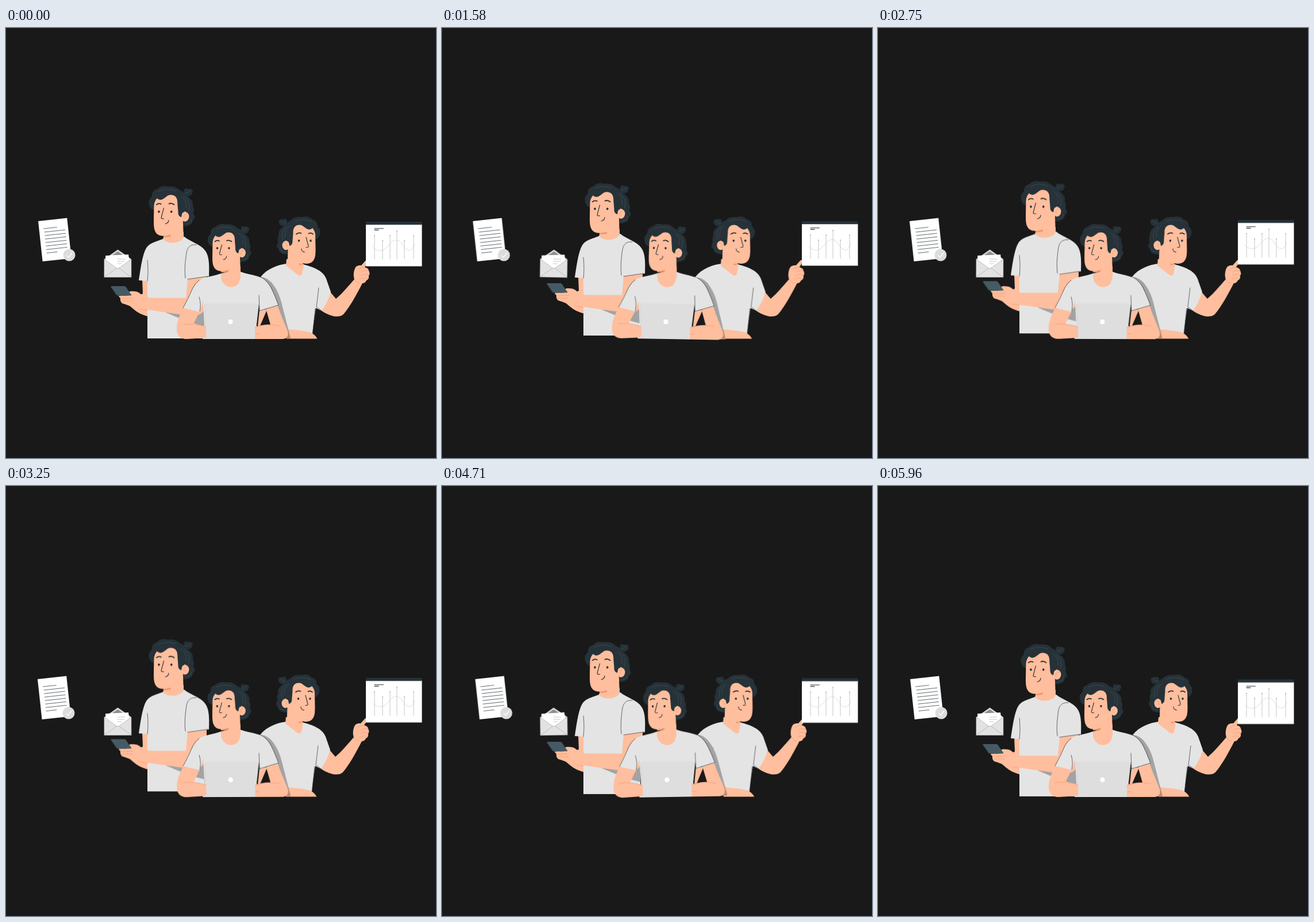
An HTML page without scripts that plays this animation: 748 by 748 pixels, repeating every 6 s.

```html
<!DOCTYPE html>
<html lang="en">
<head>
<meta charset="utf-8">
<title>Three colleagues</title>
<style>
  html, body { margin: 0; width: 100%; height: 100%; overflow: hidden; background: #191919; }
  svg { display: block; width: 100vw; height: 100vh; }

  .skin { fill: #ffbe9d; }
  .shade { fill: #eb996e; }
  .hair { fill: #263238; }
  .shirt { fill: #e4e4e4; }
  .dim { fill: #a3a3a3; }
  .ink, .crease, .strand, .thin, .wave { fill: none; stroke-linecap: round; stroke-linejoin: round; }
  .ink { stroke: #263238; stroke-width: .7; }
  .bold { stroke-width: 1.1; }
  .brow { stroke-width: 1.7; }
  .crease { stroke: #eb996e; stroke-width: .7; }
  .strand { stroke: #455a64; stroke-width: .6; }
  .thin { stroke: #a0a0a0; stroke-width: .6; }
  .wave { stroke: #c8c8c8; stroke-width: .6; }

  .float { animation: rise 6s linear infinite; }
  .bob { animation: rise 1.5s linear infinite; }
  .shake { animation: shake 6s ease-in-out infinite; }
  .sway { animation: sway 6s linear infinite; }
  .desk { transform-origin: 391px 441px; }
  .mail { transform-origin: 194px 410px; }

  @keyframes rise {
    50% { transform: translateY(-9.5px); }
  }
  @keyframes shake {
    0%, 100% { transform: translateX(0); }
    10%, 90% { transform: translateX(-1px); }
    20%, 80% { transform: translateX(2px); }
    30%, 50%, 70% { transform: translateX(-4px); }
    40%, 60% { transform: translateX(4px); }
  }
  @keyframes sway {
    0%, 50%, 100% { transform: rotate(0deg); }
    25% { transform: rotate(1deg); }
    75% { transform: rotate(-1deg); }
  }
</style>
</head>
<body>
<svg viewBox="0 0 748 748" xmlns="http://www.w3.org/2000/svg">
  <defs>
    <g id="head">
      <path class="hair" d="M362 381C355 381 351 375 351 368C350 362 355 361 356 357C356 350 360 347 365 346C369 341 376 340 383 342C391 340 399 344 402 348Q406 349 409 352C407 346 412 343 416 346C421 344 425 349 422 353C420 358 415 358 413 357C419 361 425 366 423 374C426 379 425 383 424 386C428 391 427 395 423 397C424 403 416 407 408 407L385 400Z"/>
      <path class="skin" d="M359.500 370C361 363 363 358 367 358L387 354C397 354 400 361 400 369L402 384C406 381 416 382 417 390C417 398 411 401 407 398L408 426H388L387 420.500C379 423.500 370 424 365 420C359.500 415 359 408 359 398Z"/>
      <path class="hair" d="M359 373C359 364 358 354 364 349C375 344 394 347 401 353C409 361 411 373 409 384Q405 383 404.500 392Q398.500 391 399 382L398 370C398.500 360 394 355.500 387 355.500C380 355.500 378 362 371 363.500Q367 364 364.500 361Q361 364 359 373Z"/>
      <path class="strand" d="M366 350Q380 343 395 349M404 357Q414 364 412 377M409 358Q421 367 416 382M411 352Q415 353 419 348M412 403Q421 402 421 395"/>
      <path class="crease" d="M409 394Q407 387 413 387"/>
      <path class="ink brow" d="M363.500 371.500Q367 368.500 371 370.500M384 370Q388 368 392.500 371.500"/>
      <path class="ink bold" d="M375.500 377L371.500 392Q370.500 395 375.500 394.500M378 403Q383.500 402 383.500 397"/>
      <ellipse class="hair" cx="367.500" cy="383" rx="1.700" ry="2"/>
      <ellipse class="hair" cx="388" cy="383" rx="1.700" ry="2"/>
    </g>
  </defs>

  <!-- document with tick -->
  <g class="shake">
    <g transform="translate(56 336) rotate(-6.2)">
      <path fill="#fff" d="M0 0H50.500V70.500H0Z"/>
      <path class="ink" d="M8 14H31M9 20.100H45M9 26.200H45M9 32.300H45M9 38.400H45M9 44.500H45M9 50.600H45M9 56.700H27"/>
    </g>
    <circle cx="110" cy="395" r="10.500" fill="#dcdcdc"/>
    <path d="M105.500 395.500L109 399L115 391" fill="none" stroke="#fff" stroke-width="1.300"/>
  </g>

  <!-- envelope -->
  <g class="sway mail">
    <path fill="#dedede" d="M171 402L194.500 385.500L218 402V433.500H171Z"/>
    <path fill="#8f8f8f" d="M185 395L194.500 388.500L204 395Z"/>
    <path fill="#fff" d="M173 396L213 394L215 410L194.500 420L174 411Z"/>
    <path class="thin" d="M194 402H207M194 406H206M194 410H201"/>
    <path fill="#e2e2e2" d="M171 402L192 417Q194.500 418.500 197 417L218 402V433.500H171Z"/>
    <path class="thin" d="M171 402L192 417.500Q194.500 419 197 417.500L218 402V433.500H171ZM171 433.500L192 418M218 433.500L197 418"/>
  </g>

  <!-- standing man with phone -->
  <g class="float">
    <path class="skin" d="M237 437H250V502C234 500 221 490 209 477L222 470L238 462Z"/>
    <path class="crease" d="M213 478Q228 490 246 491"/>
    <path class="shirt" d="M273 367C262 371 250 374 244.500 382C237 394 234 420 231 439L246 440V540H345V434L353 432C354 410 353 397 347 388C339 376 321 372 310 363Q290 360 273 367Z"/>
    <path class="skin" d="M274 355H309V364C305 374 282 378 273 367Q275 362 274 355Z"/>
    <path class="shade" d="M274 358Q287 360 298 350Q293 365 274 364Z"/>
    <path class="dim" d="M278 495L345 490V519Q325 514 309 508Z"/>
    <path class="skin" d="M316 437L349 433V478C347 496 337 501 320 500C290 497 262 492 238 489C222 488 211 481 202 479Q198 475 199 470L196 467Q198 464 202 466L218 466C219 464 216 462 214 460Q215 457 222 458C231 458 234 463 240 467Q248 470 258 469.500H313Z"/>
    <path fill="#455a64" d="M182 450Q183 449 185 449H206Q208 449 209 451L219 466H197Q194 466 193 464Z"/>
    <path fill="#37474f" d="M182 450L194 465L197 466H195L192 465Z"/>
    <path class="skin" d="M197 468Q199 465 206 466L222 465Q219 471 208 471Z"/>
    <path class="crease" d="M202 471L221 470M202 475L220 475"/>
    <path class="ink" d="M246 404Q248 423 246 440M331 377C318 376 314 384 313 398Q310 418 312 435M316 437L351 432"/>
    <use href="#head" transform="translate(257.500 275) scale(1.06) translate(-359.5 -341)"/>
  </g>

  <!-- presenting man -->
  <g class="shake">
    <path class="skin" d="M563 458L574 471C586 461 597 447 606 437C603 428 606 419 609 415Q614 412 618 413L626 404Q630 402 630 407L624 416Q631 418 631 422Q634 427 631 431Q632 437 627 439Q625 444 620 444C610 463 599 484 587 498C579 505 564 502 549 492L541 484Z"/>
    <path class="crease" d="M613 421Q617 415 623 417M618 425Q623 420 631 423M618 431Q623 426 631 430M617 437Q622 433 628 436M606 437Q609 443 615 444"/>
    <path class="shirt" d="M488 410C473 412 455 418 443 433L450 480L490 540H532Q535 512 539 487L549 492Q560 477 565 459L557 436C552 423 538 417 517 411Z"/>
    <path class="skin" d="M488 402H511L518 412L515 428Q512 433 506 428L487 413Z"/>
    <path class="shade" d="M500 405Q508 411 518 410Q509 416 499 408Z"/>
    <path class="ink" d="M544 452Q542 470 540 485L549 492M538 488L534 527M458 470L470 455"/>
    <path class="skin" d="M487 524C503 525 523 527 531 530Q538 534 541.500 540.500H488Z"/>
    <use href="#head" transform="translate(897.5 -13) scale(-1 1)"/>
  </g>

  <!-- chart panel -->
  <g class="bob">
    <path fill="#fff" d="M626 341H723.500V414.500H626Z"/>
    <path class="hair" d="M626 337H723.500V342.200H626Z"/>
    <path class="ink bold" d="M641 348.800H656.500M641 351.400H648"/>
    <path class="thin" d="M641 361V402M655 370V402M668 361V402M680 353V402M693 370V402M709 361V402"/>
    <path class="wave" d="M638 381C643 386 648 388 653 387C665 385 668 368 680 369C690 370 691 387 702 387Q708 386 711 376"/>
    <path class="ink bold" d="M641 361h.1M655 370h.1M668 361h.1M680 353h.1M693 370h.1M709 361h.1"/>
  </g>

  <!-- seated man with laptop -->
  <g class="sway desk">
    <path class="dim" d="M443 433Q457 434 466 448Q475 461 479 477L491 524H465Z"/>
    <path fill="#b98b73" d="M478 524H491L495 540H478Z"/>
    <path class="skin" d="M311 484C304 494 297 509 297 522C296 534 303 541 314 541L348 539V519L326 515L338 491ZM472 481C477 497 485 514 490 527Q493 539 482 541H433V519L460 516L452 488Z"/>
    <path class="skin" d="M441 490H454L442 518H438Z"/>
    <path class="shirt" d="M374 427C360 432 344 433 336 439C323 451 317 471 308 487L337 494L343 475L346 541H433L440 480L441 493L474 482C467 466 461 447 449 437C439 430 421 429 408 424Z"/>
    <path class="skin" d="M388 415H408V425Q409 438 403 446Q392 455 381 447Q373 440 374 427L386 424Z"/>
    <path class="shade" d="M374 421Q387 423 397 414Q392 426 374 425Z"/>
    <path class="ink" d="M308 487Q317 471 325 452Q330 443 336 439M337 493Q340 481 336 468M441 492L440 465M441 492L474 482Q469 468 461 451Q454 439 443 433"/>
    <path fill="#dedede" d="M347 479.500H436Q439 479 438.500 482L433 541H342V539H347L345 482Q345 480 347 479.500Z"/>
    <path fill="none" stroke="#cfcfcf" stroke-width=".6" d="M345.500 481L348 538M438.500 482L433 541"/>
    <circle cx="390.500" cy="511" r="4.200" fill="#fff"/>
    <path class="skin" d="M312 516Q329 514 348 520V538L326 540L305 536ZM433 521Q447 515 466 516L483 524L479 540H433Z"/>
    <path class="crease" d="M308 516Q328 513 347 520M433 521Q452 513 475 518M434 532H440"/>
    <use href="#head"/>
  </g>
</svg>
</body>
</html>
```
